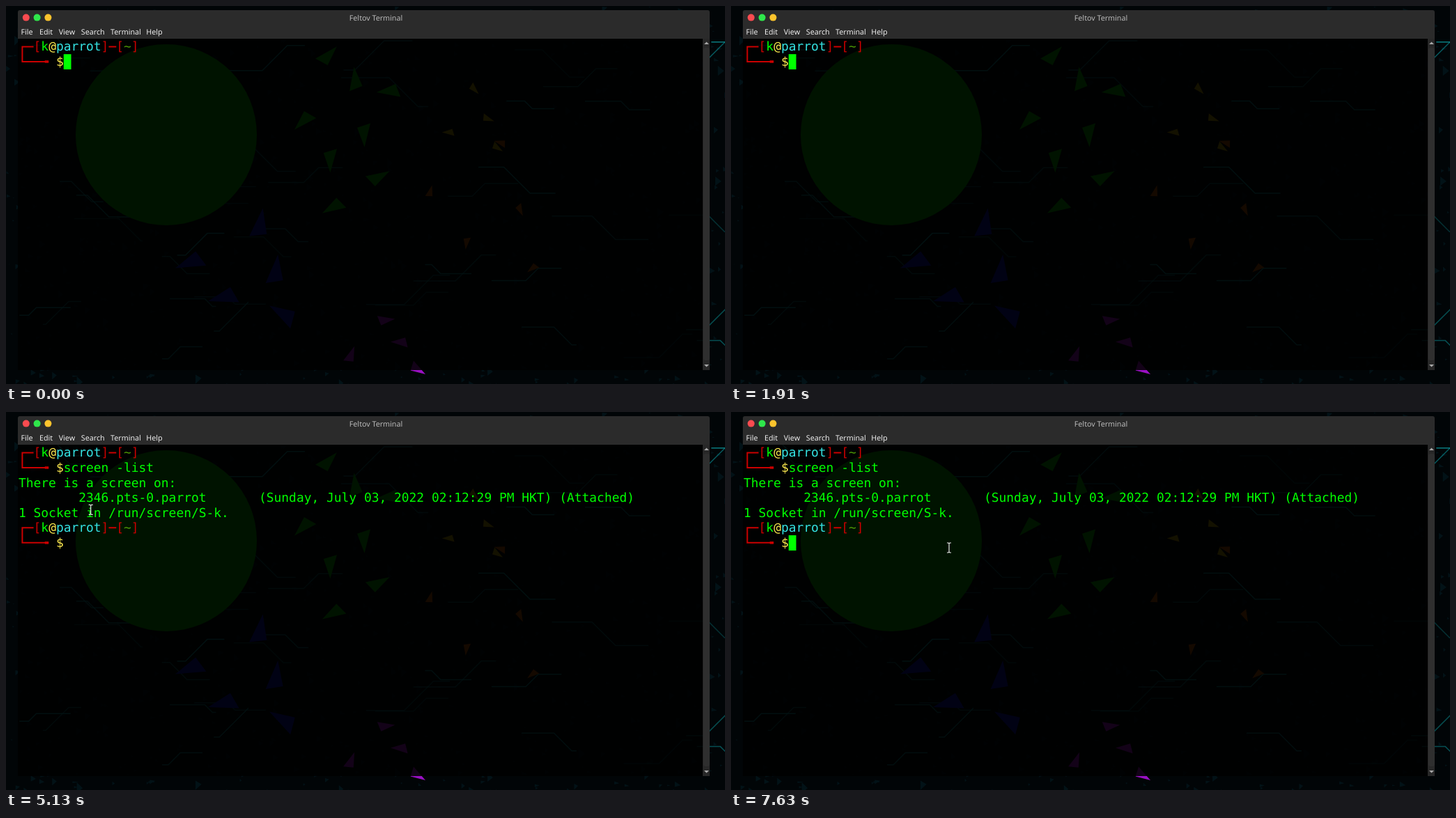
Animation of 1032x543 px, one loop 7.69 s. Source, as an HTML page:

```html
<!DOCTYPE html>
<html lang="en">
<head>
<meta charset="utf-8">
<title>Terminal session</title>
<style>
  html, body { margin: 0; width: 100%; height: 100%; overflow: hidden; background: #000; }
  svg { display: block; width: 100%; height: 100%; text-rendering: geometricPrecision; }
  #frame { font: 10.7px "Noto Sans", sans-serif; fill: #ededed; }
  #term { font: 17.92px "DejaVu Sans Mono", monospace; }
  #term text { white-space: pre; }
</style>
</head>
<body>
<svg viewBox="0 0 1032 543" xmlns="http://www.w3.org/2000/svg">
  <rect width="1032" height="543" fill="#010507"/>
  <g id="wallpaper" fill="none"></g>
  <rect x="17" y="46" width="993" height="477" fill-opacity=".88"/>
  <g id="frame">
    <path d="M17 47V9q0-3 3-3H1007q3 0 3 3V47Z" fill="#2b2b2b"/>
    <text x="531" y="20.8" text-anchor="middle" fill="#b9b9b9">Feltov Terminal</text>
    <rect x="1000" y="47" width="10" height="476" fill="#282828"/>
    <rect x="1001" y="60" width="9" height="449" rx="3" fill="#2f2f2f"/>
    <path d="M1002 55l3.5 -3.5 3.5 3.5ZM1002 515l3.5 3.5 3.5 -3.5Z" fill="#a8a8a8"/>
    <g id="controls"></g>
  </g>
  <g id="term"></g>
  <path id="beam" d="M-3 -7H-1L0 -6 1 -7H3M0 -6V6M-3 7H-1L0 6 1 7H3" fill="none" stroke="#e8e8e8" stroke-width="1.2"/>
</svg>

<script>
const LOOP = 7690, TICK = 128.3, BLINK = 583;
const LEFT = 18, TOP = 47.6, CW = 10.788, RH = 21.58;
const GREEN = '#00ff00', RED = '#cc0000', YELLOW = '#fce94f', CYAN = '#34e2e2';
const COMMAND = 'screen -list';
const $ = id => document.getElementById(id);

const splash = `
GNU Screen version 4.08.00 (GNU) 05-Feb-20

Copyright (c) 2018-2020 Sebastian Gorlev, Wojciech Brelawski
Copyright (c) 2015-2017 Guenter Zaldert, Sebastian Gorlev, Wojciech Brelawski
Copyright (c) 2010-2014 Guenter Zaldert, Kamrul Nafiz Mozumdari
Copyright (c) 2008-2009 Guenter Zaldert, Andreas Kloeppner, Jonah Tevin, Kamrul Nafiz
Mozumdari
Copyright (c) 1993-2007 Guenter Zaldert, Andreas Kloeppner
Copyright (c) 1987 Stefan Beldorn

This program is free software; you can redistribute it and/or modify it under the terms
of the GNU General Public License as published by the Free Software Foundation; either
version 3, or (at your option) any later version.

This program is distributed in the hope that it will be useful, but WITHOUT ANY WARRANTY;
without even the implied warranty of MERCHANTABILITY or FITNESS FOR A PARTICULAR PURPOSE.
See the GNU General Public License for more details.


${' '.repeat(23)}[Press Space for next page; Return to end.]`.split('\n');

const socket = '2346.pts-0.parrot';
const session = socket.padStart(25).padEnd(32) + '(Sunday, July 03, 2022 02:12:29 PM HKT) (Attached)';

const colX = col => LEFT + col * CW;
const rowY = row => TOP + row * RH;

function line(row, ...runs) {
  const spans = runs.map(([s, color = GREEN]) => `<tspan fill="${color}">${s}</tspan>`).join('');
  return `<text x="${LEFT}" y="${rowY(row) + 16.75}" xml:space="preserve">${spans}</text>`;
}

function block(row, from, to = from + 1) {
  const x = colX(from), width = Math.min(colX(to), 1000) - x;
  return `<rect x="${x}" y="${rowY(row)}" width="${width}" height="21.9" fill="${GREEN}"/>`;
}

// The connecting rules run through the cell centres.
function prompt(row, command) {
  const y = rowY(row + 0.5);
  const rules = `M${colX(2)} ${y}H${colX(0.5)}v${RH}H${colX(4)}M${colX(12)} ${y}h${CW}`;
  return `<path d="${rules}" fill="none" stroke="${RED}" stroke-width="2"/>` +
    `<path d="M${colX(3.5)} ${y + RH}H${colX(4)}" stroke="${RED}" stroke-width="3.5"/>` +
    line(row, ['  [', RED], ['k'], ['@', YELLOW], ['parrot', CYAN], ['] [', RED], ['~', '#4e9a06'], [']', RED]) +
    line(row + 1, ['     $', YELLOW], [command]);
}

// Both commands are typed at a steady pace, the second one speeding up slightly.
function typedAt(n) {
  const x = n < 15 ? n - 1 : n - 20;
  if (x < 0) return 0;
  const count = n < 15 ? 2.01 + x * 2 / 3 : 1.25 + 0.74 * x + 0.014 * x * x;
  return Math.min(Math.floor(count), COMMAND.length);
}

// A drag, then a double click for the word and a triple click for the line.
function selectionAt(n) {
  if (n >= 44 && n < 50) return [9, Math.min(24, 5 * n - 210)];
  if (n === 54) return [0, 92];
  if (n === 53 || n === 56 || n === 57) return [8, 8 + socket.length];
  return [0, 0];
}

function listing(from, to) {
  return prompt(0, COMMAND) +
    line(2, ['There is a screen on:']) +
    (to > from ? block(3, from, to) : '') +
    line(3, [session.slice(0, from)], [session.slice(from, to), '#000'], [session.slice(to)]) +
    line(4, ['1 Socket in /run/screen/S-k.']) +
    prompt(5, '');
}

function screenAt(t) {
  const n = Math.floor((t + 27) / TICK);
  const cursor = (row, col, since) =>
    Math.floor(Math.max(0, t - since) / BLINK) % 2 ? '' : block(row, col);
  if (n >= 8 && n < 15) return splash.map((s, i) => line(i, [s])).join('') + cursor(21, 0, 1060);
  if (n >= 33) return listing(...selectionAt(n)) + cursor(6, 6, 4130);
  const typed = typedAt(n);
  return prompt(0, COMMAND.slice(0, typed)) + block(1, 6 + typed);
}

const path = [[4750, 494, 227], [5260, 51, 124], [5550, 112, 126], [5920, 264, 128],
  [6050, 279, 127], [6560, 238, 124.5], [7380, 238, 124.5], [7630, 313, 195]];

function pointerAt(t) {
  const next = path.findIndex(p => p[0] > t);
  if (next === 0) return [-50, -50];
  if (next < 0) return path.at(-1).slice(1);
  const [t0, x0, y0] = path[next - 1], [t1, x1, y1] = path[next];
  const u = (t - t0) / (t1 - t0), k = u * u * (3 - 2 * u);
  return [x0 + (x1 - x0) * k, y0 + (y1 - y0) * k];
}

function random(seed) {
  return () => (seed = seed * 16807 % 2147483647) / 2147483647;
}

function haze(rnd) {
  let d = '';
  for (let i = 0; i < 900; i++) {
    const s = 2 + rnd() * 7;
    d += `M${rnd() * 1032} ${rnd() * 543}l${s} ${s * rnd()} ${-s} ${s * rnd()}Z`;
  }
  return `<path d="${d}" fill="#052028" opacity=".5"/>`;
}

// Circuit traces: a straight run, a 45 degree bend, another run.
function traces(rnd) {
  let out = '';
  for (let i = 0; i < 46; i++) {
    const bend = 10 + rnd() * 35, turn = rnd() < 0.5 ? bend : -bend;
    out += `<path d="M${rnd() * 1032} ${rnd() * 543}h${rnd() * 70}l${bend} ${turn}h${rnd() * 50}"
      stroke="#0b8f94" stroke-width="1.5" opacity="${0.3 + rnd() * 0.6}"/>`;
  }
  return out;
}

// Shards lie on a sunflower spiral squeezed into an ellipse.
function shards(rnd, { color, x, y, rx, ry, size, count }) {
  let d = '';
  for (let i = 0; i < count; i++) {
    const r = Math.sqrt((i + 0.5) / count), a = i * 2.4, tilt = rnd() * 6.28;
    const corners = [0, 1.9, 3.6].map((step, k) => {
      const reach = size * (k ? 0.7 : 1.2), angle = tilt + step;
      return `${x + rx * r * Math.cos(a) + reach * Math.cos(angle)} ${y + ry * r * Math.sin(a) + reach * Math.sin(angle)}`;
    });
    d += `M${corners.join('L')}Z`;
  }
  return `<path d="${d}" fill="${color}"/>`;
}

function paint() {
  const rnd = random(11);
  const clusters = [
    { color: '#00a000', x: 495, y: 180, rx: 85, ry: 125, size: 19, count: 8 },
    { color: '#a08a00', x: 667, y: 160, rx: 65, ry: 55, size: 10, count: 4 },
    { color: '#a84a00', x: 705, y: 290, rx: 105, ry: 130, size: 10, count: 5 },
    { color: '#0a0fa8', x: 355, y: 385, rx: 90, ry: 95, size: 24, count: 5 },
    { color: '#9a10c4', x: 535, y: 485, rx: 95, ry: 45, size: 14, count: 4 }
  ];
  $('wallpaper').innerHTML = haze(rnd) + traces(rnd) +
    '<circle cx="230" cy="185" r="130" fill="#00a000"/>' +
    clusters.map(c => shards(rnd, c)).join('');

  const buttons = ['#fb4b50', '#2fe64b', '#fbc32d'].map((color, i) =>
    `<circle cx="${28.8 + i * 15.8}" cy="16.6" r="5" fill="${color}"/>`);
  const menu = { File: 21.5, Edit: 48, View: 75.7, Search: 107.8, Terminal: 150, Help: 201.3 };
  const labels = Object.entries(menu).map(([name, x]) => `<text x="${x}" y="41">${name}</text>`);
  $('controls').innerHTML = [...buttons, ...labels].join('');
}

let shown = '';
function update(t) {
  const markup = screenAt(t);
  if (markup !== shown) $('term').innerHTML = shown = markup;
  $('beam').setAttribute('transform', `translate(${pointerAt(t).join()})`);
}

function tick() {
  update(performance.now() % LOOP);
  requestAnimationFrame(tick);
}

paint();
tick();
</script>
</body>
</html>
```
